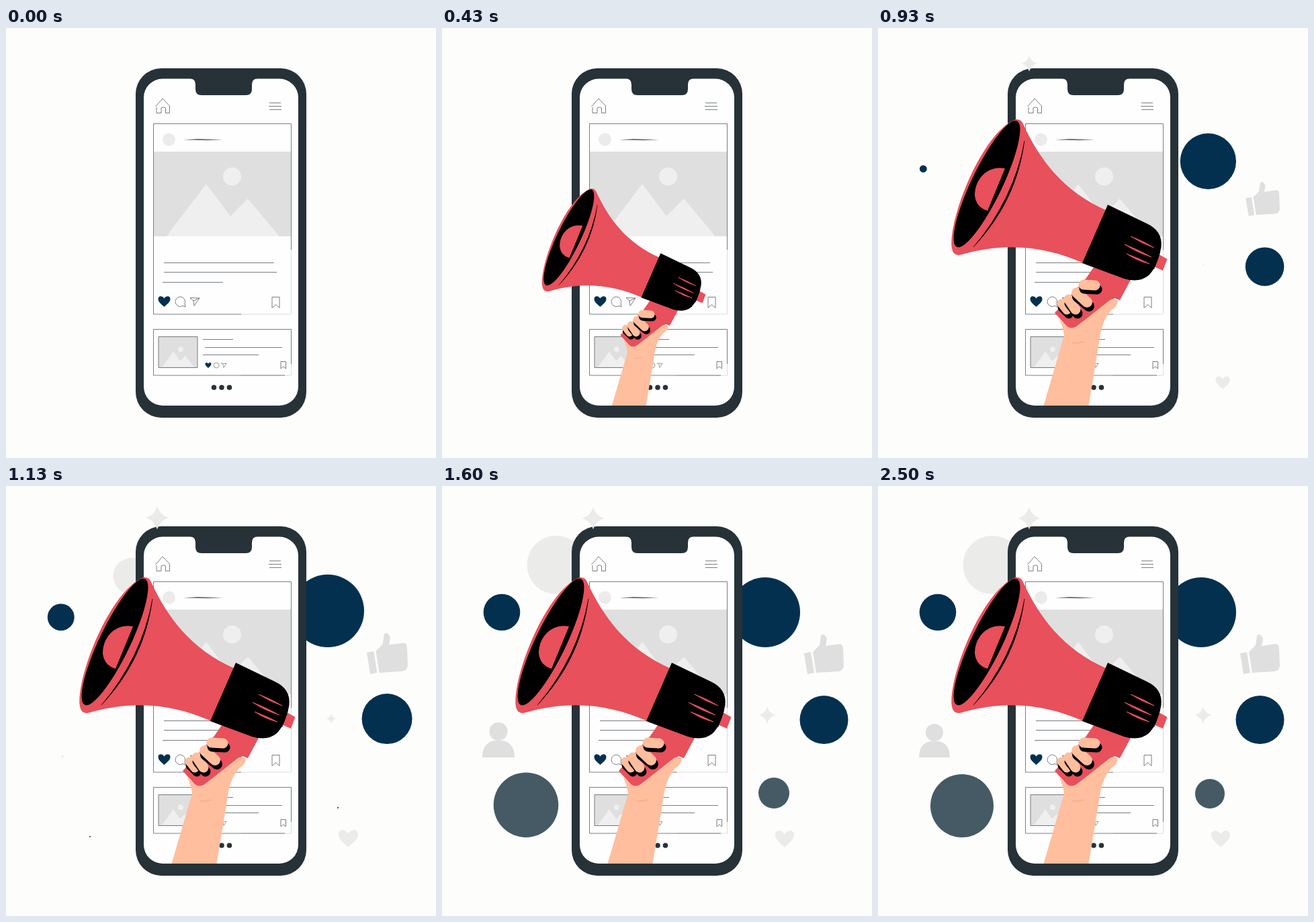
Animation of 640 by 640 pixels, one loop 2.53 s. Source, as an HTML page with a canvas:

```html
<!DOCTYPE html>
<html lang="en">
<head>
<meta charset="utf-8">
<title>Social megaphone</title>
<style>
html, body { margin: 0; width: 100%; height: 100%; overflow: hidden; background: #fdfdfc; }
canvas { display: block; width: 100vmin; height: 100vmin; }
</style>
</head>
<body>
<canvas id="stage" width="640" height="640"></canvas>
<script>
const ctx = document.getElementById('stage').getContext('2d');
const LOOP = 2530;
const C = {
  paper: '#fdfdfc', screen: '#fefefe', phone: '#263238', line: '#6a7074', faint: '#d6d8d9',
  sand: '#dfdfdf', cream: '#efefef', pale: '#ebebea', navy: '#04304f', slate: '#455a64',
  heart: '#04304f', red: '#e8505b', skin: '#ffbe9d', black: '#000'
};

function fill(d, color) {
  ctx.fillStyle = color;
  ctx.fill(new Path2D(d));
}

function stroke(d, color = C.line, width = 0.9) {
  ctx.strokeStyle = color;
  ctx.lineWidth = width;
  ctx.stroke(new Path2D(d));
}

function disc(x, y, r, color) {
  ctx.fillStyle = color;
  ctx.beginPath();
  ctx.arc(x, y, r, 0, Math.PI * 2);
  ctx.fill();
}

function box(x, y, w, h, r, color) {
  ctx.fillStyle = color;
  ctx.beginPath();
  ctx.roundRect(x, y, w, h, r);
  ctx.fill();
}

function scaled(x, y, s, draw) {
  if (s <= 0) return;
  ctx.save();
  ctx.translate(x, y);
  ctx.scale(s, s);
  ctx.translate(-x, -y);
  draw();
  ctx.restore();
}

const clamp = x => Math.min(1, Math.max(0, x));
const smooth = x => x * x * (3 - 2 * x);

// Grow past full size, then settle back.
function pop(t, start) {
  const rise = smooth(Math.pow(clamp((t - start) / 579), 1.15));
  const settle = smooth(clamp((t - start - 579) / 200));
  return 1.045 * rise - 0.045 * settle;
}

function heart(x, y, w, color) {
  ctx.save();
  ctx.translate(x, y);
  ctx.scale(w / 20, w / 20);
  fill('M0 9 C-4 5 -10 1 -10 -4 C-10 -10 -3 -10 0 -5 C3 -10 10 -10 10 -4 C10 1 4 5 0 9Z', color);
  ctx.restore();
}

function sparkle(x, y, r) {
  const k = r * 0.22;
  fill(`M${x} ${y - r} Q${x + k} ${y - k} ${x + r} ${y} Q${x + k} ${y + k} ${x} ${y + r}
    Q${x - k} ${y + k} ${x - r} ${y} Q${x - k} ${y - k} ${x} ${y - r}Z`, C.pale);
}

function thumb() {
  fill(`M539 249 L549 247 L554 278 L544 280Z M552 247 L562 237 L564 223 Q568 217 573 227 L571 238
    L592 235 Q597 236 597 242 L598 268 Q597 275 590 276 L557 278Z`, C.sand);
}

function person() {
  disc(84, 367, 13, C.sand);
  fill('M61 404 Q61 384 77 380 L91 380 Q107 384 107 404Z', C.sand);
}

// Circular badges: centre, radius, colour, fixed point, start time.
const badges = [
  [481, 188, 52, C.navy, 533, 240, 514],
  [568.5, 348, 36, C.navy, 604, 384, 514],
  [89, 188, 27.3, C.navy, 62, 215, 740],
  [170, 117.5, 43.5, C.pale, 213, 161, 780],
  [125, 476, 47, C.slate, 125, 523, 1061],
  [494, 458, 22, C.slate, 494, 480, 1026]
];

function floaters(t) {
  for (const [x, y, r, color, ax, ay, start] of badges) {
    scaled(ax, ay, pop(t, start), () => disc(x, y, r, color));
  }
  scaled(598, 280, pop(t, 490), thumb);
  scaled(84, 404, pop(t, 1019), person);
  scaled(524, 537, pop(t, 525), () => heart(510, 525, 28, C.pale));
  scaled(484, 354, pop(t, 790), () => sparkle(484, 341, 12.5));
}

function scene() {
  fill('M239 310 L298 232 L334 280 L360 254 L407 310Z', C.cream);
  disc(336.5, 221, 13.5, C.cream);
}

function bookmark(x, y, w, h) {
  stroke(`M${x} ${y} h${w} v${h} l${-w / 2} ${-h * 0.3} l${-w / 2} ${h * 0.3}Z`);
}

function phone() {
  box(193, 60, 254, 520, 38, C.phone);
  box(205, 75.5, 230, 486.5, 28, C.screen);
  fill(`M274 75 Q282 76 282 84 V91 Q282 100 291 100 H357 Q366 100 366 91 V84
    Q366 76 374 75Z`, C.phone);

  stroke('M222.5 117 L233 105 L243.5 116 V126.5 H237.5 V119 Q234 116.5 231 119 V126.5 H224 V118');
  stroke('M392 111.5 H409 M391 116.5 H410 M392 121.5 H410');

  stroke('M350 426 H424.5 V320', C.faint);
  stroke('M350 426 H219.5 V142.5 H424.5 V330');
  disc(242.5, 166, 9.5, C.pale);
  fill('M264 166.5 L285 165 L323 166.2 L300 167.2Z', C.line);
  ctx.fillStyle = C.sand;
  ctx.fillRect(220, 184, 204, 126);
  scene();
  stroke('M235 349.5 H399 M235 363.5 H403 M233 378.5 H323');
  heart(235.5, 407, 18, C.heart);
  stroke('M263 413.5 A7.2 7.2 0 1 1 266 410 L267 415Z');
  stroke('M274 401.5 L288 402 L280 413.5 L279 406Z M279 406 L288 402');
  bookmark(396, 400.5, 11, 16);

  stroke('M350 517 H424.5 V448', C.faint);
  stroke('M415 517 H219.5 V448.5 H424.5 V500');
  ctx.fillStyle = C.sand;
  ctx.fillRect(227, 459.5, 58, 46.5);
  ctx.save();
  ctx.beginPath();
  ctx.rect(227, 459, 58, 47);
  ctx.clip();
  ctx.translate(164, 413);
  ctx.scale(0.285, 0.295);
  scene();
  ctx.restore();
  stroke('M227 459.5 H285 V505.5 H227Z');
  stroke('M293 463.5 H338 M296 475.5 H411 M293 486.5 H376');
  heart(301, 502, 9, C.heart);
  stroke('M317 502 A4 4 0 1 1 309 502 A4 4 0 1 1 317 502', C.line, 0.7);
  stroke('M320.5 499 L328 499.5 L324 505.5 L323.5 501.5Z', C.line, 0.7);
  bookmark(409, 496.5, 7.5, 10.5);
  for (const x of [309.5, 321, 332.5]) disc(x, 535, 3.8, C.phone);
}

function finger(x1, y1, x2, y2, r, color) {
  ctx.lineCap = 'round';
  stroke(`M${x1} ${y1} L${x2} ${y2}`, color, r * 2);
  ctx.lineCap = 'butt';
}

function megaphone() {
  // handle and arm
  fill(`M321 356 L376 375 L360 405 L352 402 L297 443 Q288 450 281 444 L263 424 L310 372Z`, C.red);
  fill(`M246.5 562 L277 458 Q276 446 269 432 L281 444 Q288 450 297 443 L345 405 Q354 401 357 408
    Q355 415 346 421 Q332 438 329 468 L313.5 562Z`, C.skin);
  stroke('M289 469 Q299 469.5 306 467', '#f0a583', 1);

  // each finger sits on its own shadow
  const fingers = [
    [273, 410, 281, 420, 6.5], [284, 404, 294, 419, 7.5],
    [296, 394, 311, 408, 8], [306, 382, 323, 383, 7.5]
  ];
  for (const [x1, y1, x2, y2, r] of fingers) {
    finger(x1 + 1, y1 + 6, x2 + 3, y2 + 6, r, C.black);
    finger(x1, y1, x2, y2, r, C.skin);
  }

  // bell
  fill(`M205 136 Q213 135 216 143 C240 195 275 243 341 272 L306 350 C250 325 190 318 125 337
    Q112 341 110 328 C104 285 155 155 205 136Z`, C.red);
  ctx.save();
  ctx.translate(162, 232);
  ctx.rotate(Math.atan2(-188, 90));
  ctx.fillStyle = C.black;
  ctx.beginPath();
  ctx.ellipse(0, 0, 104, 23, 0, 0, Math.PI * 2);
  ctx.fill();
  ctx.restore();
  fill('M189 209 L163 272 Q146 267 144 249 C144 222 166 204 189 209Z', C.red);
  fill('M218 168 Q207 258 142 326 Q202 254 218 168Z', C.black);
  stroke('M218 168 Q205 257 142 326', C.black, 0.8);

  // collar and mouthpiece
  fill('M415 335 L430.5 344 L424 361 L408 354Z', C.red);
  fill('M413 330 L420 334 L411 359 L403 355Z', C.black);
  fill(`M342 263 L400 291 Q424 302 421.5 326 Q416 355 403 368 Q389 380 366 373 L304 350Z`, C.black);
  for (const d of ['M376 310 Q395 317 411 327 Q393 321 376 310Z',
    'M367 322 Q388 330 407 341 Q385 334 367 322Z',
    'M370 336 Q389 343 404 351 Q386 347 370 336Z']) {
    fill(d, C.red);
    stroke(d, C.red, 0.8);
  }
}

function render(t) {
  ctx.fillStyle = C.paper;
  ctx.fillRect(0, 0, 640, 640);
  floaters(t);
  phone();
  scaled(225, 65, pop(t, 545), () => sparkle(225, 48, 16.5));
  scaled(273, 562, pop(t, 30), megaphone);
}

const origin = performance.now();
function tick() {
  render((performance.now() - origin) % LOOP);
  requestAnimationFrame(tick);
}
tick();
</script>
</body>
</html>
```
